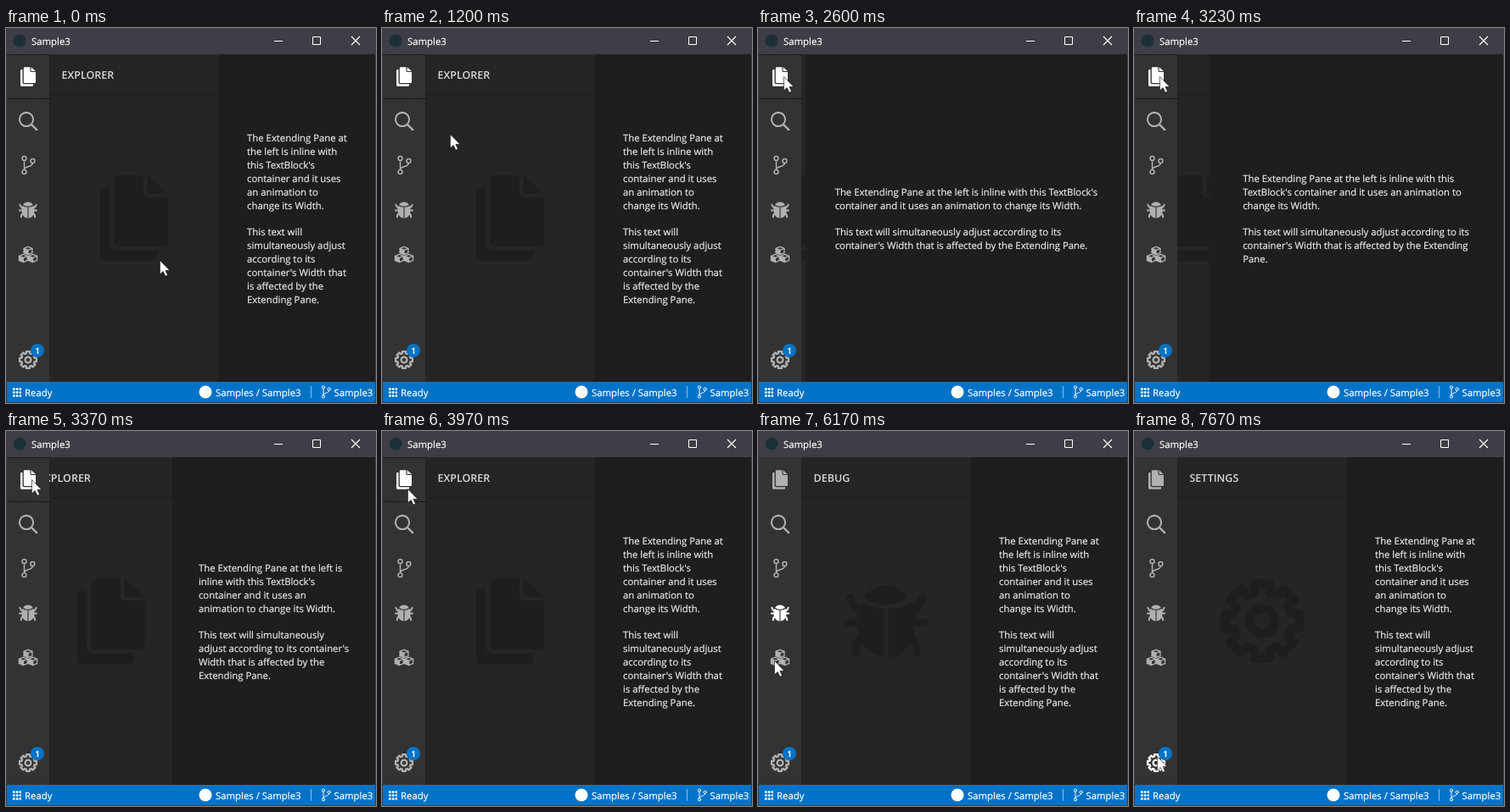
An HTML page that plays this animation: 436x443 px, repeating every 8 s.

```html
<!DOCTYPE html>
<html lang="en">
<head>
<meta charset="utf-8">
<title>Sample3</title>
<style>
  html, body { margin: 0; width: 100%; height: 100%; overflow: hidden; background: #1e1e1e; }
  svg { display: block; }
  text { font: 11.35px "Open Sans", "Noto Sans", sans-serif; fill: #fff; stroke: #fff; stroke-width: .2; text-rendering: geometricPrecision; white-space: pre; }
  .head { font-size: 12.5px; font-weight: 600; fill: #d8d8d8; stroke: none; }
  .body text { fill: #e8e8e8; stroke: #e8e8e8; }
  .fill { fill: currentColor; }
  .line { fill: none; stroke: currentColor; stroke-linecap: round; stroke-linejoin: round; }
  .glyph { fill: none; stroke: #fff; }
</style>
</head>
<body>
<svg id="stage" width="436" height="443">
  <defs>
    <!-- icons are drawn around 0,0 in a box about 100 units high -->
    <g id="files" class="fill">
      <path transform="translate(-40 -50.5)" d="M23 0H51V21q0 5 5 5H80V78q0 6-6 6H23q-6 0-6-6V6q0-6 6-6zM56 0L80 22H56zM11 13V79q0 10 10 10H67V95q0 6-6 6H6q-6 0-6-6V19q0-6 6-6z"/>
    </g>
    <g id="search" class="line" stroke-width="9">
      <circle cx="-9" cy="-9" r="36"/>
      <path d="M18 18L45 45" stroke-width="11"/>
    </g>
    <g id="branch" class="line" stroke-width="6.5">
      <circle cx="-20" cy="-36" r="11"/>
      <circle cx="-20" cy="36" r="11"/>
      <circle cx="24" cy="-22" r="11"/>
      <path d="M-20-25V25M24-11C24 14-20 2-20 25"/>
    </g>
    <g id="bug">
      <path class="fill" d="M-26-28Q-16-42 0-42T26-28Q0-10-26-28z"/>
      <g id="bugHalf">
        <path class="fill" d="M-2.5-14Q-20-15-29-23Q-38-2-32 18Q-24 40-2.5 43z"/>
        <path class="line" stroke-width="9" d="M-28-11Q-40-16-43-28M-30 2H-45M-28 20Q-37 25-36 37"/>
      </g>
      <use href="#bugHalf" transform="scale(-1 1)"/>
    </g>
    <g id="cube">
      <path class="line" stroke-width="6" d="M0-21L22-12V12L0 21L-22 12V-12zM-22-12L0-3L22-12M0-3V21"/>
      <path class="fill" d="M-22-12L0-3V21L-22 12z"/>
    </g>
    <g id="cubes">
      <use href="#cube" y="-20"/>
      <use href="#cube" x="-25" y="20"/>
      <use href="#cube" x="25" y="20"/>
    </g>
    <g id="gear" class="line" stroke-width="10.5">
      <path id="teeth"/>
      <circle r="15"/>
    </g>
  </defs>

  <rect width="436" height="443" fill="#3f3e46"/>
  <rect x="1" y="31" width="434" height="387" fill="#1e1e1e"/>

  <circle cx="16" cy="15" r="7.5" fill="#1b3038"/>
  <text x="30" y="20">Sample3</text>
  <path class="glyph" d="M316 15.5H326M361.5 10.5H370.5V19.5H361.5z"/>
  <path class="glyph" stroke-width="1.2" d="M407 10L417 20M417 10L407 20"/>

  <g class="body" id="body"></g>

  <svg id="pane" x="51" y="31" width="200" height="387">
    <rect width="200" height="387" fill="#252526"/>
    <rect y="46" width="200" height="3" fill="#212122"/>
    <text class="head" id="head" y="29"></text>
    <use id="big" color="#1e1e1e"/>
  </svg>

  <rect x="1" y="31" width="50" height="387" fill="#333"/>
  <path id="focus" d="M1 31.5H51M1 83.5H51" stroke="#000" stroke-dasharray="1 1" stroke-dashoffset="1"/>
  <g id="bar"></g>
  <circle cx="37" cy="381" r="8" fill="#0173c7"/>
  <text x="37" y="384.7" text-anchor="middle" style="font-size:10px;font-weight:600">1</text>

  <rect x="1" y="418" width="434" height="24" fill="#0173c7"/>
  <path d="M8 426.5H18M8 430.5H18M8 434.5H18" stroke="#fff" stroke-width="2.6" stroke-dasharray="2.6 1.2"/>
  <text x="22" y="435">Ready</text>
  <circle cx="235" cy="430" r="7.5" fill="#fff"/>
  <text x="247" y="435">Samples / Sample3</text>
  <path d="M359.5 423V437" stroke="#8fc1e6"/>
  <use href="#branch" color="#fff" transform="translate(377 430) scale(.15)"/>
  <text x="386.5" y="435">Sample3</text>

  <g id="tip">
    <rect x="30.5" y="77.5" width="56" height="24" fill="#fff" stroke="#bdbdbd"/>
    <text x="37" y="94" style="fill:#3c3c3c;stroke:none">Explorer</text>
  </g>
  <path id="cursor" d="M.4.6V17L4.1 13.5L6.9 19.2L9.6 18L6.9 12.4H12z" fill="#fff" stroke="#000" stroke-width=".6"/>
</svg>

<script>
const LOOP = 8000, FRAME = 100 / 3, SLIDE = 470;
const SIDE = 51, RIGHT = 435, PANE = 200, MARGIN = 30.2;
const SIZE = 11.35, LEADING = 15.96;

const $ = id => document.getElementById(id);
const make = (tag, parent, attrs = {}) => {
  const el = document.createElementNS('http://www.w3.org/2000/svg', tag);
  set(el, attrs);
  return parent.appendChild(el);
};
const set = (el, attrs) => { for (const k in attrs) el.setAttribute(k, attrs[k]); };
const clamp = v => Math.max(0, Math.min(1, v));

// icon, y in the side bar, pane title, time of the click
const views = [
  ['files', 57.5, 'EXPLORER', 0],
  ['search', 110, 'SEARCH', 4466],
  ['branch', 162, 'SOURCE CONTROL', 5300],
  ['bug', 215, 'DEBUG', 5733],
  ['cubes', 267.5, 'EXTENSIONS', 6800],
  ['gear', 392, 'SETTINGS', 7666]
];

// time, x, y of the pointer, and how it gets there
const path = [
  [0, 181, 274], [667, 181, 274], [1500, 38, 62, 'smooth'], [1533, 35, 60],
  [1633, 35, 60], [1700, 30, 57],
  [3933, 30, 57], [3967, 30, 68], [4233, 28, 109, 'out'],
  [4633, 28, 109], [4900, 27, 162, 'smooth'],
  [5433, 27, 162], [5567, 30, 228, 'smooth'],
  [5933, 30, 228], [6067, 15, 298, 'smooth'], [6133, 16, 296], [6167, 19, 271], [6467, 19, 269, 'out'],
  [6967, 19, 269], [7267, 27, 384, 'smooth'], [LOOP, 27, 384]
];
const ease = {
  smooth: p => p * p * (3 - 2 * p),
  out: p => 1 - (1 - p) ** 2,
  cubic: p => 1 - (1 - p) ** 3
};

const paragraphs = [
  "The Extending Pane at the left is inline with this TextBlock's container and it uses an animation to change its Width.",
  "This text will simultaneously adjust according to its container's Width that is affected by the Extending Pane."
];

const ring = [];
for (let i = 0; i < 8; i++)
  for (const [r, off] of [[35, -.27], [45, -.2], [45, .2], [35, .27]]) {
    const a = i * Math.PI / 4 + off;
    ring.push((r * Math.sin(a)).toFixed(1) + ' ' + (-r * Math.cos(a)).toFixed(1));
  }
$('teeth').setAttribute('d', 'M' + ring.join('L') + 'z');

const buttons = views.map(([icon, y]) =>
  make('use', $('bar'), { href: '#' + icon, transform: `translate(26 ${y}) scale(.225)` }));
const rows = Array.from({ length: 14 }, () => make('text', $('body')));

const ctx = document.createElement('canvas').getContext('2d');
ctx.font = '100px "Open Sans", "Noto Sans", sans-serif';
const measure = s => ctx.measureText(s).width * SIZE / 100;

function wrap(width) {
  const lines = [];
  paragraphs.forEach((p, i) => {
    if (i) lines.push('');
    let line = '';
    for (const word of p.split(' ')) {
      const longer = line ? line + ' ' + word : word;
      if (line && measure(longer) > width) {
        lines.push(line);
        line = word;
      } else line = longer;
    }
    lines.push(line);
  });
  return lines;
}

function pointer(t) {
  let i = 1;
  while (i < path.length - 1 && t > path[i][0]) i++;
  const [t0, x0, y0] = path[i - 1], [t1, x1, y1, kind] = path[i];
  const raw = clamp((t - t0) / (t1 - t0)), p = kind ? ease[kind](raw) : raw;
  return [Math.round(x0 + (x1 - x0) * p), Math.round(y0 + (y1 - y0) * p)];
}

function hovered([x, y]) {
  if (x >= SIDE) return -1;
  if (y >= 366) return 5;
  const i = Math.floor((y - 31) / 52.5);
  return i < 5 ? i : -1;
}

function paneWidth(t) {
  const shut = ease.cubic(clamp((t - 2267) / SLIDE));
  const open = ease.cubic(clamp((t - 3202) / SLIDE));
  return PANE * (t < 3202 ? 1 - shut : open);
}

function drawBody(w) {
  const room = RIGHT - SIDE - w;
  const lines = wrap(room - 2 * MARGIN);
  const left = SIDE + w + (room - Math.max(...lines.map(measure))) / 2;
  const top = 224.5 - lines.length * LEADING / 2 + 12.95;
  rows.forEach((row, i) => {
    row.textContent = lines[i] || '';
    set(row, { x: left.toFixed(2), y: Math.round(top + i * LEADING) });
  });
}

let lastWidth = -1;
function draw(now) {
  // the picture advances 30 times a second
  const t = Math.floor((now % LOOP + 3.4) / FRAME) * FRAME;
  const w = paneWidth(t);
  const current = views.filter(v => t >= v[3]).length - 1;
  const hover = hovered(pointer(Math.max(0, t - FRAME)));

  buttons.forEach((b, i) => set(b, { color: i === current || i === hover ? '#fff' : '#b0b0b0' }));
  $('focus').style.display = current ? 'none' : '';

  // pane content stays centred while the pane is clipped
  set($('pane'), { width: w.toFixed(2) });
  $('head').textContent = views[current][2];
  set($('head'), { x: 14.5 + (w - PANE) / 2 });
  set($('big'), { href: '#' + views[current][0], transform: `translate(${w / 2} 193.5)` });
  if (w !== lastWidth) drawBody(lastWidth = w);

  $('tip').style.opacity = t < 2267 ? clamp((t - 1870) / 260) : 0;
  set($('cursor'), { transform: `translate(${pointer(t)})` });
}

const start = performance.now();
function tick() {
  draw(performance.now() - start);
  requestAnimationFrame(tick);
}
tick();
</script>
</body>
</html>
```
